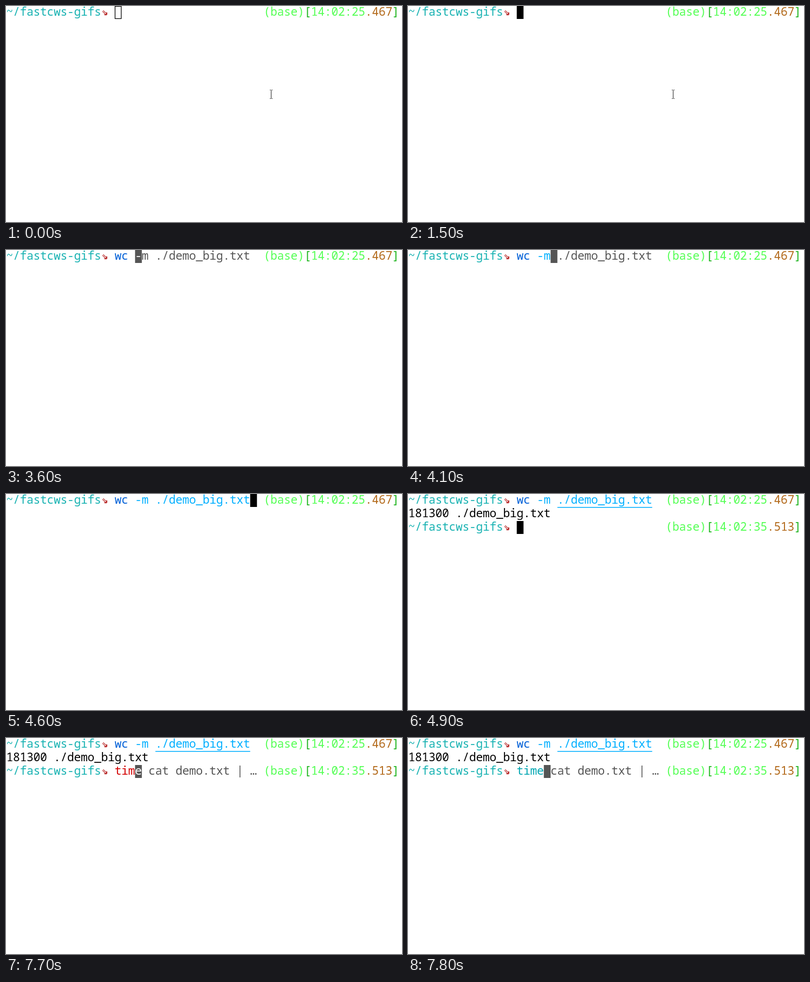
Animation of 731 by 400 pixels, one loop 8 s. Source, as an HTML page with a canvas:

```html
<!DOCTYPE html>
<html lang="en">
<head>
<meta charset="utf-8">
<title>Terminal session</title>
<style>
  html, body { margin: 0; width: 100%; height: 100%; overflow: hidden; background: #fff; }
  canvas { display: block; }
</style>
</head>
<body>
<canvas id="screen" width="731" height="400"></canvas>
<script>
const ctx = document.getElementById('screen').getContext('2d');
const LOOP = 8000, CELL = 12.5, LINE = 25, LEFT = 0.75, BASELINE = 18, INPUT = 16;
const FONT = '500 21.3px "Noto Sans Mono", "DejaVu Sans Mono", monospace';
const ARROW_FONT = 'bold 20px "DejaVu Sans Mono", monospace';
const COLOR = {
  path: '#18b2b2', arrow: '#b21818', env: '#54ff54', bracket: '#18b218', millis: '#b26818',
  command: '#005fd7', argument: '#00afff', hint: '#555555', error: '#d40000', keyword: '#00a6b2'
};
const COUNT_COMMAND = 'wc -m ./demo_big.txt', TIME_COMMAND = 'time cat demo.txt | …';

// [time, number of characters entered]
const COUNT_KEYS = [[3000, 1], [3300, 2], [3600, 3], [3900, 4], [4100, 5], [4600, 20]];
const TIME_KEYS = [[7500, 1], [7600, 2], [7700, 3], [7800, 4]];

const entered = (keys, t) => keys.reduce((n, [at, count]) => t >= at ? count : n, 0);
const columnX = col => LEFT + col * CELL;

function write(row, col, text, color) {
  ctx.font = FONT;
  ctx.fillStyle = color;
  [...text].forEach((char, i) =>
    ctx.fillText(char, columnX(col + i + 0.5), row * LINE + BASELINE));
}

function prompt(row, clock, millis) {
  write(row, 0, '~/fastcws-gifs', COLOR.path);
  ctx.font = ARROW_FONT;
  ctx.fillStyle = COLOR.arrow;
  ctx.fillText('⇘', columnX(14.5), row * LINE + BASELINE - 1);
  write(row, 38, '(base)', COLOR.env);
  write(row, 44, '[', COLOR.bracket);
  write(row, 45, clock, COLOR.env);
  write(row, 53, millis, COLOR.millis);
  write(row, 57, ']', COLOR.bracket);
}

function cursor(row, col, under = '') {
  ctx.fillStyle = under ? COLOR.hint : '#000';
  ctx.fillRect(columnX(col), row * LINE, CELL, 24);
  write(row, col, under, '#fff');
}

function hollowCursor(row, col) {
  ctx.strokeStyle = '#000';
  ctx.lineWidth = 1.25;
  ctx.strokeRect(columnX(col) + 0.6, row * LINE + 0.6, CELL - 1.2, 22.8);
}

function commandLine(row, text, count, colorAt) {
  [...text].forEach((char, i) =>
    write(row, INPUT + i, char, i < count ? colorAt(i) : COLOR.hint));
}

function pointer() {
  ctx.fillStyle = '#e8e8e8';
  ctx.fillRect(488, 157, 3, 14);
  ctx.fillStyle = '#444';
  ctx.fillRect(489, 156, 1, 15);
  for (const y of [155, 171]) {
    ctx.fillRect(487, y, 2, 1);
    ctx.fillRect(490, y, 2, 1);
  }
}

function draw(t) {
  ctx.fillStyle = '#fff';
  ctx.fillRect(0, 0, 731, 400);
  ctx.textAlign = 'center';
  prompt(0, '14:02:25', '.467');

  if (t < 3000) {
    pointer();
    (t < 1500 ? hollowCursor : cursor)(0, INPUT);
    return;
  }

  const count = entered(COUNT_KEYS, t);
  commandLine(0, COUNT_COMMAND, count, i => i < 2 ? COLOR.command : COLOR.argument);
  if (t < 4900) {
    cursor(0, INPUT + count, COUNT_COMMAND[count]);
    return;
  }

  ctx.fillStyle = COLOR.argument;
  ctx.fillRect(columnX(22), 24, 14 * CELL, 1.5);
  write(1, 0, '181300 ./demo_big.txt', '#000');
  prompt(2, '14:02:35', '.513');

  const typed = entered(TIME_KEYS, t);
  if (typed) commandLine(2, TIME_COMMAND, typed, () => typed < 4 ? COLOR.error : COLOR.keyword);
  cursor(2, INPUT + typed, typed ? TIME_COMMAND[typed] : '');
}

const start = performance.now();
function frame() {
  draw((performance.now() - start) % LOOP);
  requestAnimationFrame(frame);
}
frame();
</script>
</body>
</html>
```
